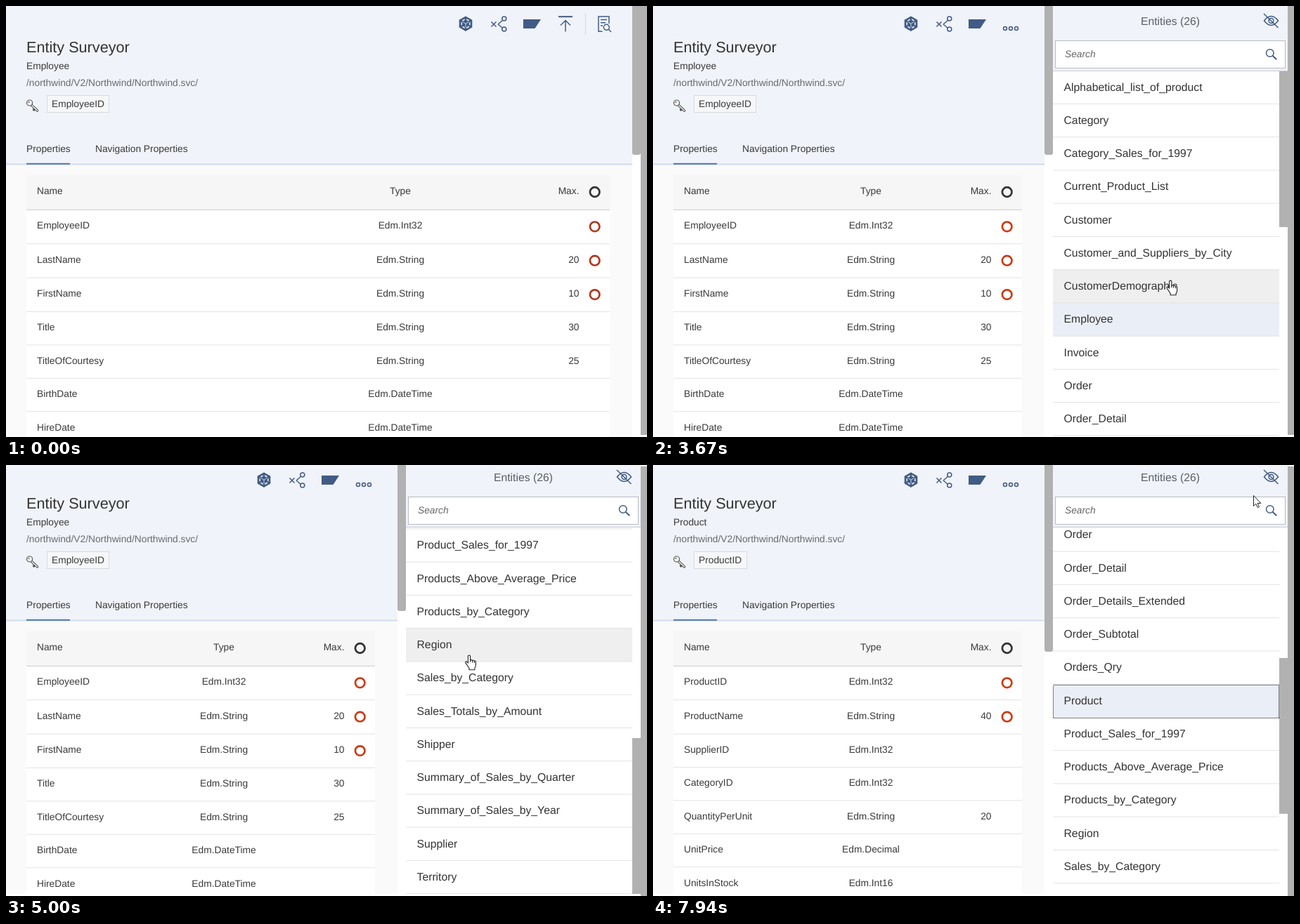
Recreate the animation shown at these times as an HTML page. Size 912 px wide and 614 px high, loop 8 s.

```html
<!DOCTYPE html>
<html lang="en">
<head>
<meta charset="utf-8">
<title>Entity Surveyor</title>
<style>
  html, body { margin: 0; width: 100%; height: 100%; overflow: hidden; background: #fff; }
  svg { display: block; width: 912px; height: 614px; }
  text { font: 13.78px "Liberation Sans", Arial, sans-serif; fill: #3a3a3a; text-rendering: geometricPrecision; }
  .title { font-size: 21.65px; fill: #333; }
  .path { fill: #686b6f; }
  .entity { font-size: 15.75px; fill: #333; }
  .heading { font-size: 15.75px; fill: #5a5e64; }
  .search { font-style: italic; fill: #666; }
  .tip { font-size: 10.4px; fill: #666; }
  .mid { text-anchor: middle; }
  .end { text-anchor: end; }
  .ico { fill: none; stroke: #415c84; stroke-width: 1.5; }
  .solid { fill: #415c84; }
  .bar { fill: #b1b1b1; }
  #focus { shape-rendering: crispEdges; }
</style>
</head>
<body>
<svg id="stage" viewBox="0 0 912 614"></svg>
<script>
const LOOP = 8000, ROW = 47.25, LIST_TOP = 91.9, HEAD_BG = '#f0f3f9';

const entities = ['Alphabetical_list_of_product', 'Category', 'Category_Sales_for_1997', 'Current_Product_List',
  'Customer', 'Customer_and_Suppliers_by_City', 'CustomerDemographic', 'Employee', 'Invoice', 'Order',
  'Order_Detail', 'Order_Details_Extended', 'Order_Subtotal', 'Orders_Qry', 'Product', 'Product_Sales_for_1997',
  'Products_Above_Average_Price', 'Products_by_Category', 'Region', 'Sales_by_Category', 'Sales_Totals_by_Amount',
  'Shipper', 'Summary_of_Sales_by_Quarter', 'Summary_of_Sales_by_Year', 'Supplier', 'Territory'];

// name, type, max length, required
const employee = { name: 'Employee', key: 'EmployeeID', chip: 88, rows: [
  ['EmployeeID', 'Int32', '', 1], ['LastName', 'String', 20, 1], ['FirstName', 'String', 10, 1],
  ['Title', 'String', 30], ['TitleOfCourtesy', 'String', 25], ['BirthDate', 'DateTime', ''], ['HireDate', 'DateTime', '']] };
const product = { name: 'Product', key: 'ProductID', chip: 75, rows: [
  ['ProductID', 'Int32', '', 1], ['ProductName', 'String', 40, 1], ['SupplierID', 'Int32', ''],
  ['CategoryID', 'Int32', ''], ['QuantityPerUnit', 'String', 20], ['UnitPrice', 'Decimal', ''], ['UnitsInStock', 'Int16', '']] };

const text = (x, y, s, cls = '') => `<text x="${x}" y="${y}" class="${cls}">${s}</text>`;
const rect = (x, y, w, h, fill, more = '') => `<rect x="${x}" y="${y}" width="${w}" height="${h}" fill="${fill}" ${more}/>`;
const ring = (x, y, color) => `<circle cx="${x}" cy="${y}" r="6.8" fill="none" stroke="${color}" stroke-width="2.7"/>`;
const path = (d, cls = 'ico', more = '') => `<path d="${d}" class="${cls}" ${more}/>`;
const circle = (x, y, r) => `<circle cx="${x}" cy="${y}" r="${r}" class="ico"/>`;

function toolbar(wide) {
  const shared =
    path('M654 14.5l9.3 5.3v10.8l-9.3 5.3-9.3-5.3V19.8z', 'solid') +
    path('M654 18.3l5.8 3.4v6.9l-5.8 3.4-5.8-3.4v-6.9z', '',
      `fill="none" stroke="${HEAD_BG}" stroke-width="1.5" stroke-dasharray="4 2.75" stroke-dashoffset="-1.4"`) +
    path('M654 25.2v5M654 25.2l-4.2-2.5M654 25.2l4.2-2.5', '', `stroke="${HEAD_BG}" stroke-width=".8"`) +
    path('M690.5 22.5l7 7M697.5 22.5l-7 7M700 26l6.5-5.5M700 26l6.5 5.5') + circle(708.8, 18, 3) + circle(708.8, 33, 3) +
    path('M736 19h25l-8.5 13H736z', 'solid');
  if (!wide) return `<g transform="translate(-287)">${shared}</g>` + [501, 509, 517].map(x => circle(x, 32, 2.5)).join('');
  return shared +
    path('M786 15.2h20', 'ico', 'style="stroke-width:2"') + path('M796 36.5V20.5M789 27.5l7-7 7 7') +
    rect(824, 10, 1, 31, '#d3d8e0') +
    rect(832, 6, 40, 40, '#d0d3d8', 'rx="3" id="button"') +
    path('M848.5 36.2H843V15h15v10M846 19.5h9M846 23.8h7M846 28h3M857.5 33.5l3.5 3.5') + circle(854.3, 30.3, 4);
}

function page(entity, wide) {
  const width = wide ? 891 : 557, right = wide ? 859 : 525;
  const typeX = wide ? 561 : 310, maxX = right - 43.5, ringX = right - 21.3;
  const red = wide ? '#b03a1e' : '#cb3a14';
  let out = rect(0, 0, width, 615, '#fafafa') + rect(0, 0, width, 225, HEAD_BG) + rect(0, 224.6, width, 1.8, '#d0daec') +
    toolbar(wide) +
    text(29, 66, 'Entity Surveyor', 'title') + text(29, 90, entity.name) +
    text(29, 114, '/northwind/V2/Northwind/Northwind.svc/', 'path') +
    path('M36 141l8.5 8M41.5 146l-1.8 1.8', '', 'stroke="#555" stroke-width="3.6" stroke-linecap="round"') +
    path('M36 141l8.5 8', '', 'stroke="#f6f6f6" stroke-width="1.4" stroke-linecap="round"') +
    `<circle cx="33.6" cy="138" r="4" fill="#f6f6f6" stroke="#555" stroke-width="1.2"/><circle cx="32.5" cy="137" r="1" fill="#555"/>` +
    rect(58.5, 127.5, entity.chip, 24, '#f6f7f9', 'stroke="#d9dadc"') + text(65, 144.4, entity.key) +
    text(29, 208, 'Properties') + text(127, 208, 'Navigation Properties') + rect(29, 223.8, 62, 2, '#4d77b5') +
    rect(29, 241, right - 29, 374, '#fff') + rect(29, 241, right - 29, 49, '#f6f6f6') + rect(29, 289.8, right - 29, 1.1, '#cfcfcf') +
    text(44, 268, 'Name') + text(typeX, 268, 'Type', 'mid') + text(maxX, 268, 'Max.', 'end') + ring(ringX, 265, '#333');
  let y = 290;
  for (const [name, type, max, required] of entity.rows) {
    out += text(44, y + 27.2, name) + text(typeX, y + 27.2, 'Edm.' + type, 'mid') + text(maxX, y + 27.2, max, 'end');
    if (required) out += ring(ringX, y + 24.3, red);
    y += required ? 48.4 : 47.4;
    out += rect(29, y - .2, right - 29, 1, '#e3e3e3');
  }
  return out;
}

const panel = () => rect(557, 0, 355, 615, '#fff') +
  `<g clip-path="url(#listClip)"><g id="list">` +
  rect(569, 0, 322, ROW, '#efefef', 'id="hover"') + rect(569, 0, 322, ROW, '#eaeef6', 'id="selected"') +
  entities.map((name, i) => text(584.5, LIST_TOP + i * ROW + 28.8, name, 'entity') +
    rect(569, LIST_TOP + (i + 1) * ROW - .2, 322, 1, '#e3e3e3')).join('') +
  rect(569.5, LIST_TOP + 14 * ROW + 1.6, 321, ROW - .25, 'none', 'id="focus" stroke="#111" stroke-dasharray="1 1"') +
  `</g></g>` +
  rect(569, 0, 334, 92, HEAD_BG) + rect(569, 92, 334, 1, '#c9ccd2') +
  text(736, 27, 'Entities (26)', 'heading mid') +
  path('M869.5 21q10-13 20 0q-10 13-20 0zM869 11l20.5 20') + circle(879.5, 21, 3.4) +
  rect(572.5, 49.5, 327, 39, '#fff', 'id="field" stroke="#b9bcc2"') + text(586, 73.4, 'Search', 'search') +
  `<g style="--ink:#3c5470">` + circle(877.8, 67, 5.3) + path('M881.7 71l5.5 5.3', 'ico', 'style="stroke-width:1.9"') + `</g>` +
  `<rect id="listThumb" x="891" width="12" height="222" class="bar"/>`;

document.getElementById('stage').innerHTML = `
  <clipPath id="listClip"><rect x="569" y="92" width="322" height="523"/></clipPath>
  <g id="page">
    <g id="wide">${page(employee, true)}</g>
    <g id="narrow">${page(employee, false)}</g>
    <g id="chosen">${page(product, false)}</g>
    <g id="panel">${panel()}</g>
    <rect id="pageThumb" y="-10" width="12" rx="3" class="bar"/>
  </g>
  <rect id="outerThumb" x="903" width="9" class="bar"/>
  <g id="tip">${rect(858.5, 44.5, 72, 17, '#fff', 'stroke="#c4c4c4"') + text(863, 56.5, 'Show Entities', 'tip')}</g>
  <g id="arrow" fill="#fff" stroke="#222" stroke-linejoin="round">${path('M.5.5v15l3.4-3.2 2.4 5.4 2.2-1-2.3-5.2h4.6z', '')}</g>
  <g id="hand" fill="#fff" stroke="#222" stroke-width="1.1" stroke-linejoin="round">${
    path('M-1.6 1.6q1.6-2.2 3.2 0v6q1.6-1 3 .4q1.6-.8 2.8.6q1.8-.4 2 1.6v4.6q0 2-1.5 3.8v2.6h-8v-2.4l-5-7.4q-.6-2.2 1.2-2l2.3 2.2z', '')}${
    path('M1.6 7v3.6M4.6 8.3v2.8M7.4 9v2.6', '')}</g>`;

const el = {};
document.querySelectorAll('[id]').forEach(node => el[node.id] = node);
const show = (node, on) => node.style.display = on ? '' : 'none';
const place = (node, x, y) => node.setAttribute('transform', `translate(${x} ${y})`);
const smooth = p => p * p * (3 - 2 * p);

function progress(t, start, end) {
  if (t < start) return 0;
  if (t >= end) return 1;
  const steps = Math.max(1, Math.round((end - start) / 72));
  return smooth(Math.floor((t - start) / (end - start) * steps + 1) / (steps + 1));
}

// start, end, x, y
const moves = [
  [780, 1470, 858, 24], [1540, 1630, 858, 22], [2640, 2640, 858, 23], [3340, 3700, 726.5, 420],
  [4360, 4530, 722, 500], [4690, 5000, 659, 270.5], [5380, 5700, 671, 291], [5770, 6070, 664, 302],
  [6240, 6240, 652, 338], [6700, 6790, 646, 344], [7480, 7940, 854, 43]];

function cursorAt(t) {
  let x = 795, y = 538;
  for (const [start, end, toX, toY] of moves) {
    const p = progress(t, start, end);
    x += (toX - x) * p;
    y += (toY - y) * p;
  }
  return [x, y];
}

function draw(t) {
  const open = t >= 2640, picked = t >= 6310, shift = t >= 4130 ? -4 : 0;
  const scroll = 706 * progress(t, 3700, 3990) - 268.5 * progress(t, 5070, 5240);
  const [x, y] = cursorAt(t);

  show(el.wide, !open);
  show(el.narrow, open && !picked);
  show(el.chosen, picked);
  show(el.panel, open);
  place(el.page, 0, shift);
  place(el.list, 0, -scroll);

  const overButton = !open && t >= 780 && x > 832 && y < 46;
  const overList = open && x > 569 && x < 891 && y > 93 + shift;
  const overField = open && y > 49 + shift && y < 89 + shift;
  show(el.button, overButton);
  el.field.setAttribute('stroke', overField ? '#6f8db5' : '#b9bcc2');

  const hovered = Math.floor((y - shift - LIST_TOP + scroll) / ROW);
  show(el.hover, overList && !picked);
  el.hover.setAttribute('y', LIST_TOP + hovered * ROW);
  el.selected.setAttribute('y', LIST_TOP + (picked ? 14 : 7) * ROW);
  show(el.focus, picked);

  el.listThumb.setAttribute('y', 93 + scroll / 706 * 300);
  el.pageThumb.setAttribute('x', open ? 557 : 891);
  el.pageThumb.setAttribute('height', t >= 6700 ? 280 : 222);
  el.outerThumb.setAttribute('y', t >= 4210 ? 2 : 0);
  el.outerThumb.setAttribute('height', t >= 4210 ? 612 : 611);

  el.tip.style.opacity = t < 1940 ? 0 : t < 2015 ? .35 : t < 2090 ? .7 : t < 2715 ? 1 : t < 2790 ? .75 : 0;
  const pointing = overButton || overList;
  show(el.hand, pointing);
  show(el.arrow, t >= 780 && !pointing);
  place(el.hand, x, y);
  place(el.arrow, x, y);
}

const origin = performance.now();
function tick() {
  draw((performance.now() - origin) % LOOP);
  requestAnimationFrame(tick);
}
tick();
</script>
</body>
</html>
```
